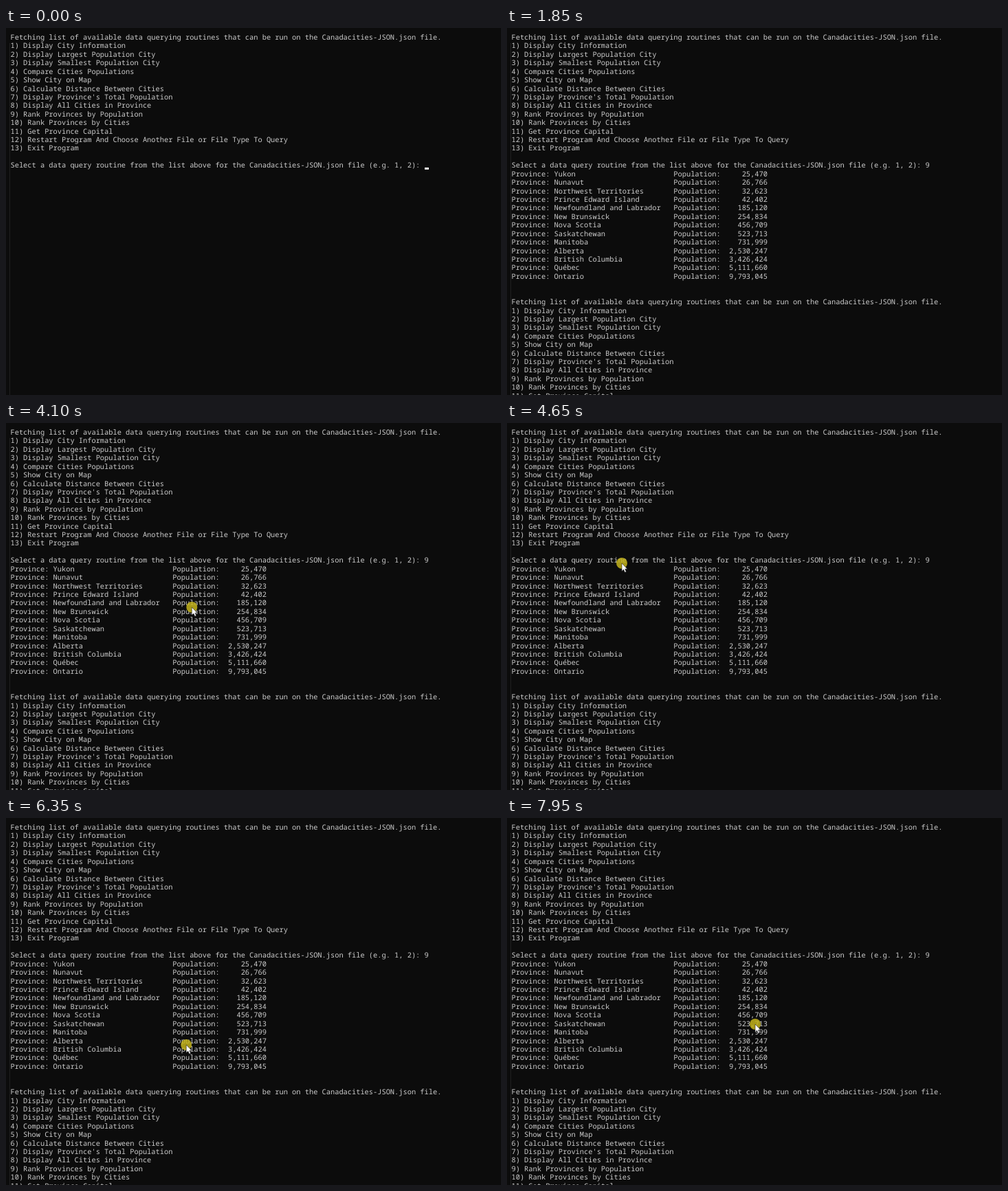
Recreate the animation shown at these times as an HTML page. Size 720 px wide and 534 px high, loop 8 s.

```html
<!DOCTYPE html>
<html lang="en">
<head>
<meta charset="utf-8">
<style>
  html, body { margin: 0; width: 100%; height: 100%; overflow: hidden; background: #0c0c0c; }
  #stage { position: relative; width: 100%; height: 100%; overflow: hidden; contain: strict; }
  #edge { position: absolute; left: 5px; top: 22px; bottom: 0; width: 1px; background: #202020; }
  #screen {
    position: absolute; left: 6.5px; top: 8px; margin: 0; color: #ccc;
    font: 10.35px/12.42px "Noto Sans Mono", monospace;
    font-variant-ligatures: none; text-rendering: geometricPrecision;
  }
  #caret { position: absolute; top: 203px; width: 6px; height: 3px; background: #f2f2f2; }
  #mouse { position: absolute; left: 0; top: 0; overflow: visible; }
</style>
</head>
<body>
<div id="stage">
  <div id="edge"></div>
  <pre id="screen"></pre>
  <div id="caret"></div>
  <svg id="mouse" width="1" height="1">
    <circle r="8" fill="#c4b41c" fill-opacity=".85"/>
    <path d="M0 0V11.5L2.6 9.2 4.4 13.3 6.4 12.4 4.7 8.5H8Z" fill="#fff" stroke="#222" stroke-width=".6"/>
  </svg>
</div>
<script>
const LOOP = 8000, STEP = 50;
const FILE = 'Canadacities-JSON.json file';
const [screenEl, caret, mouse] = ['screen', 'caret', 'mouse'].map(id => document.getElementById(id));

const routines = `Display City Information
Display Largest Population City
Display Smallest Population City
Compare Cities Populations
Show City on Map
Calculate Distance Between Cities
Display Province's Total Population
Display All Cities in Province
Rank Provinces by Population
Rank Provinces by Cities
Get Province Capital
Restart Program And Choose Another File or File Type To Query
Exit Program`.split('\n');

const provinces = `Yukon: 25,470
Nunavut: 26,766
Northwest Territories: 32,623
Prince Edward Island: 42,402
Newfoundland and Labrador: 185,120
New Brunswick: 254,834
Nova Scotia: 456,709
Saskatchewan: 523,713
Manitoba: 731,999
Alberta: 2,530,247
British Columbia: 3,426,424
Québec: 5,111,660
Ontario: 9,793,045`.split('\n').map(row => row.split(': '));

const menu = [
  `Fetching list of available data querying routines that can be run on the ${FILE}.`,
  ...routines.map((name, i) => `${i + 1}) ${name}`)
].join('\n');
const prompt = `${menu}\n\nSelect a data query routine from the list above for the ${FILE} (e.g. 1, 2): `;
const ranking = provinces.map(([name, count]) =>
  `Province: ${name.padEnd(28)}Population:${count.padStart(11)}`).join('\n');

const answered = prompt + '9';
const ranked = `${answered}\n${ranking}`;
const finished = `${ranked}\n\n\n${menu}`;

// Pointer stops; it slows down towards each one
const stops = [
  { t: 3600, x: 690, y: 528 },
  { t: 4500, x: 167, y: 204 },
  { t: 4750, x: 167, y: 204 },
  { t: 5600, x: 182, y: 258 },
  { t: 6200, x: 190, y: 350 },
  { t: 6650, x: 320, y: 314 },
  { t: 7200, x: 363, y: 214 },
  { t: 7950, x: 361, y: 300 }
];
const easeOut = u => 1 - (1 - u) ** 2;

function pointerAt(t) {
  const next = stops.findIndex(stop => stop.t > t);
  if (next < 0) return stops.at(-1);
  const a = stops[next - 1], b = stops[next];
  const k = easeOut((t - a.t) / (b.t - a.t));
  return { x: a.x + (b.x - a.x) * k, y: a.y + (b.y - a.y) * k };
}

let shown;
function draw(now) {
  const t = Math.floor(now % LOOP / STEP) * STEP;
  const text = t < 500 ? prompt : t < 1700 ? answered : t < 1750 ? ranked : finished;
  if (text !== shown) screenEl.textContent = shown = text;

  caret.hidden = t >= 1700 || (t >= 650 && t < 1250);
  caret.style.left = (t < 500 ? 609 : 615) + 'px';

  const moving = t >= stops[0].t;
  mouse.style.display = moving ? '' : 'none';
  if (moving) {
    const { x, y } = pointerAt(t);
    mouse.style.transform = `translate(${x}px, ${y}px)`;
  }
}

const start = performance.now();
function tick() {
  draw(performance.now() - start);
  requestAnimationFrame(tick);
}
tick();
</script>
</body>
</html>
```
